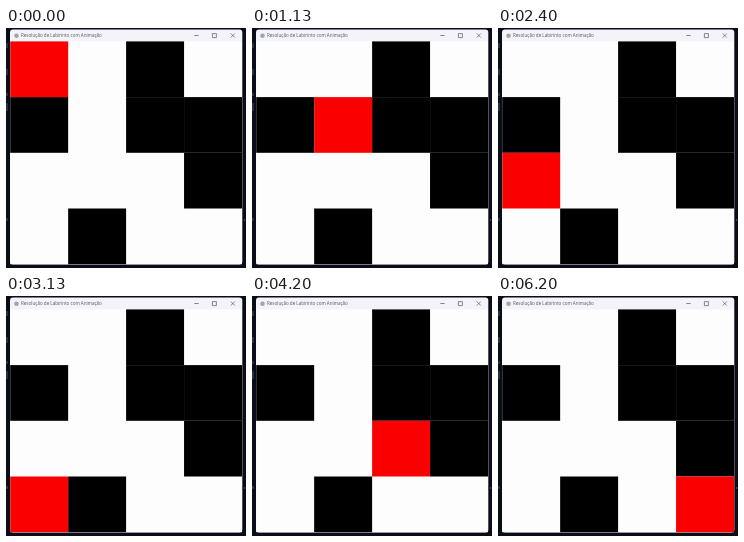
These frames come from a looping animation (240 px wide and 240 px high, 6270 ms). An HTML page:

```html
<!DOCTYPE html>
<html lang="pt">
<head>
<meta charset="utf-8">
<style>
  html, body { margin: 0; width: 100%; height: 100%; overflow: hidden; background: #090d18; }
  svg { display: block; width: 100vw; height: 100vh; }
  text { font: 4.56px "Open Sans", "Noto Sans", sans-serif; fill: #55565c; }
</style>
</head>
<body>
<svg viewBox="0 0 240 240">
  <rect width="240" height="240" fill="#090d18"/>
  <path d="M1 15v5M1 41v6M1 65v3M1 75v8M1 190v3M238.5 191v2" stroke="#3b4560" stroke-width="1.2"/>
  <rect x="4" y="1.5" width="232.3" height="235" rx="3" fill="#f3f3fa"/>
  <circle cx="10.5" cy="7.7" r="2.3" fill="#a5a3a5"/>
  <text x="15" y="9.3">Resolução de Labirinto com Animação</text>
  <path d="M188.3 7.5h4.4M206.4 5.6h4v4h-4zM224.8 5.5l4 4m0-4l-4 4" fill="none" stroke="#4d4d52" stroke-width=".65"/>
  <g id="maze"></g>
</svg>
<script>
  const LOOP = 6270, FIRST = 400, STEP = 650;
  const LEFT = 4.2, TOP = 13.4, CELL_W = 57.95, CELL_H = 55.7;
  const walls = ["..#.", "#.##", "...#", ".#.."];

  // Visited cells as [row, column], in depth-first order.
  const visits = [[0, 0], [0, 1], [1, 1], [2, 1], [2, 0], [3, 0], [2, 2], [3, 2], [3, 3]];

  const maze = document.getElementById("maze");

  function addRect(row, col, rows, cols, fill) {
    const rect = document.createElementNS("http://www.w3.org/2000/svg", "rect");
    const attrs = { width: cols * CELL_W, height: rows * CELL_H, fill };
    for (const key in attrs) rect.setAttribute(key, attrs[key]);
    maze.append(rect);
    place(rect, row, col);
    return rect;
  }

  function place(rect, row, col) {
    rect.setAttribute("x", LEFT + col * CELL_W);
    rect.setAttribute("y", TOP + row * CELL_H);
  }

  addRect(0, 0, 4, 4, "#fdfdfd");
  walls.forEach((line, row) => [...line].forEach((mark, col) => {
    if (mark === "#") addRect(row, col, 1, 1, "#000");
  }));
  const walker = addRect(0, 0, 1, 1, "#fb0000");

  const start = performance.now();
  function draw() {
    const t = (performance.now() - start) % LOOP;
    const index = Math.floor((t - FIRST) / STEP) + 1;
    place(walker, ...visits[Math.min(index, visits.length - 1)]);
    requestAnimationFrame(draw);
  }
  draw();
</script>
</body>
</html>
```
